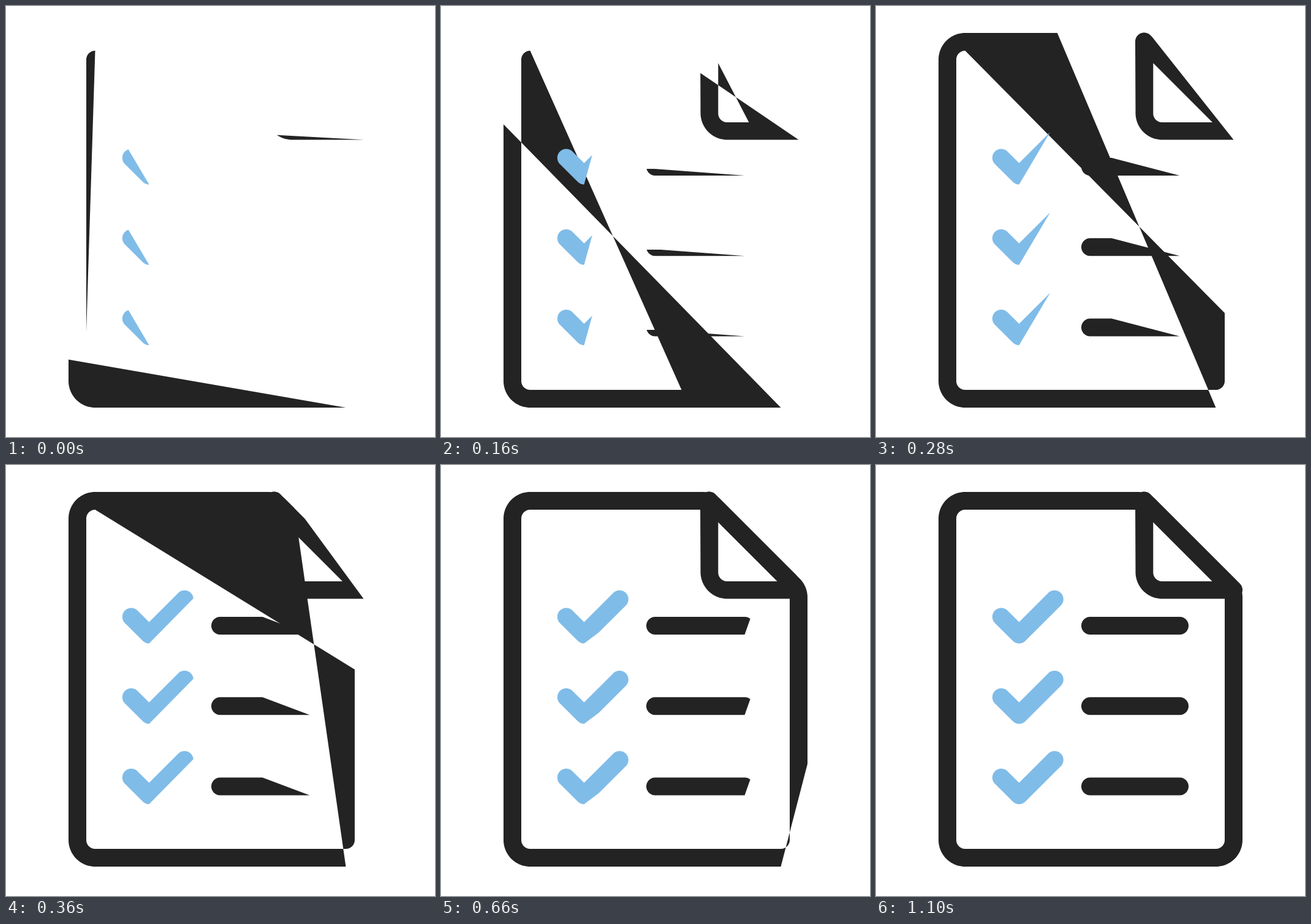
Write an HTML page with a canvas that moves like this. It is 700 px wide and 704 px high and loops after 1.6 s.

```html
<!DOCTYPE html>
<html lang="en">
<head>
<meta charset="utf-8">
<title>Checklist</title>
<style>
  html, body { margin: 0; width: 100%; height: 100%; overflow: hidden; background: #fff; }
  canvas { display: block; }
</style>
</head>
<body>
<canvas id="stage" width="700" height="704"></canvas>
<script>
const ctx = document.getElementById('stage').getContext('2d');
const LOOP = 1600, STEP = 20;
const DARK = '#232323', BLUE = '#80bce8';
const R = 43.5, r = 14.5;

// Points of an arc, angles in degrees
function arc(cx, cy, rad, from, to) {
  const n = Math.ceil(Math.abs(to - from) / 4);
  return Array.from({ length: n + 1 }, (_, i) => {
    const a = (from + (to - from) * i / n) * Math.PI / 180;
    return [cx + rad * Math.cos(a), cy + rad * Math.sin(a)];
  });
}

const sheet = [
  [[554.5, 656], ...arc(145.5, 612.5, R, 90, 180), ...arc(145.5, 87.5, R, 180, 270),
    ...arc(425.9, 87.5, R, 270, 315), ...arc(554.5, 216.2, R, 315, 360),
    ...arc(554.5, 612.5, R, 0, 90)],
  [...arc(145.5, 87.5, r, 270, 180), ...arc(145.5, 612.5, r, 180, 90),
    ...arc(554.5, 612.5, r, 90, 0), ...arc(554.5, 216.2, r, 0, -45),
    ...arc(425.9, 87.5, r, -45, -90), [145.5, 73]]
];

const fold = [
  [[583.5, 218.5], ...arc(467, 175, R, 90, 180), ...arc(437.5, 58, r, 180, 315),
    ...arc(583.5, 204, r, -45, 90)],
  [[452.3, 93.3], ...arc(466.8, 175.5, r, 180, 90), [549, 190], [452.3, 93.3]]
];

const bar = y => [[[495.5, y + r], ...arc(349.5, y, r, 90, 270), ...arc(495.5, y, r, -90, 90)]];

const tick = y => [[[233.5, y + 43.5], ...arc(233.5, y + 29, r, 90, 135),
  ...arc(204.3, y, r, 135, 315), [233.5, y + 8.5],
  ...arc(291.3, y - 28.8, r, 225, 405), ...arc(233.5, y + 29, r, 45, 90)]];

const rows = [0, 131.25, 262.5];
const shapes = [
  [sheet, DARK], [fold, DARK],
  ...rows.map(y => [bar(262.5 + y), DARK]),
  ...rows.map(y => [tick(248 + y), BLUE])
];

const dist = (a, b) => Math.hypot(b[0] - a[0], b[1] - a[1]);

// Adds the first part p of a contour; filling closes it with a straight chord
function trace(pts, p) {
  let total = 0;
  for (let i = 1; i < pts.length; i++) total += dist(pts[i - 1], pts[i]);
  let left = total * p;
  ctx.moveTo(...pts[0]);
  for (let i = 1; i < pts.length && left > 0; i++) {
    const a = pts[i - 1], b = pts[i], d = dist(a, b);
    const k = d ? Math.min(1, left / d) : 1;
    ctx.lineTo(a[0] + (b[0] - a[0]) * k, a[1] + (b[1] - a[1]) * k);
    left -= d;
  }
  ctx.closePath();
}

// Drawn part over time, joined by a smooth curve
const keys = [[0, .248], [160, .434], [280, .591], [360, .68], [520, .8217],
  [840, .969], [1000, .986], [1080, .989]];

function slope(i) {
  const a = keys[Math.max(0, i - 1)], b = keys[Math.min(keys.length - 1, i + 1)];
  const k = keys[i];
  if (a === k || b === k) return (b[1] - a[1]) / (b[0] - a[0]);
  const h0 = k[0] - a[0], h1 = b[0] - k[0];
  const s0 = (k[1] - a[1]) / h0, s1 = (b[1] - k[1]) / h1;
  return (s0 * h1 + s1 * h0) / (h0 + h1);
}

function progress(t) {
  if (t >= 1100) return 1;
  let i = 0;
  while (i < keys.length - 2 && t > keys[i + 1][0]) i++;
  const [t0, p0] = keys[i], [t1, p1] = keys[i + 1];
  const h = t1 - t0, u = (t - t0) / h, v = 1 - u;
  return p0 * v * v * (1 + 2 * u) + p1 * u * u * (1 + 2 * v)
    + h * u * v * (slope(i) * v - slope(i + 1) * u);
}

function draw(now) {
  const t = Math.floor((now % LOOP) / STEP) * STEP;
  const p = progress(t);
  ctx.clearRect(0, 0, 700, 704);
  for (const [contours, color] of shapes) {
    ctx.beginPath();
    contours.forEach(c => trace(c, p));
    ctx.fillStyle = color;
    ctx.fill('evenodd');
  }
}

let start;
function frame(now) {
  start ??= now;
  draw(now - start);
  requestAnimationFrame(frame);
}
draw(0);
requestAnimationFrame(frame);
</script>
</body>
</html>
```
